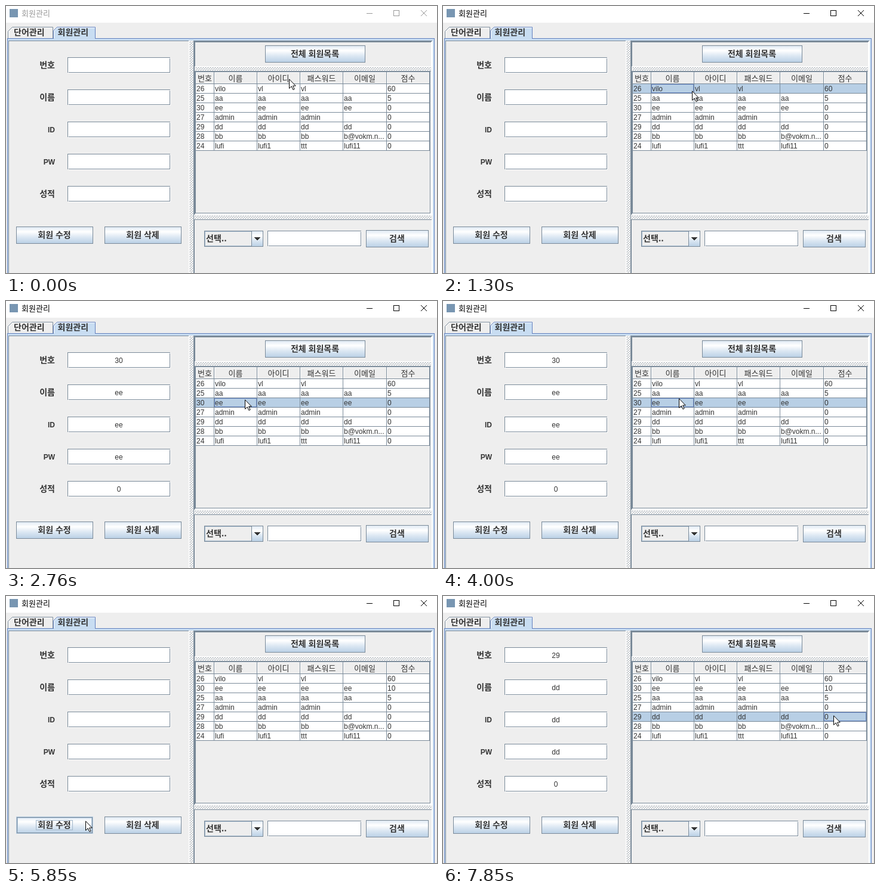
Animation of 722 by 448 pixels, one loop 8 s. Source, as an HTML page:

```html
<!DOCTYPE html>
<html lang="ko">
<head>
<meta charset="utf-8">
<style>
html, body { margin: 0; width: 100%; height: 100%; overflow: hidden; background: #eee; }
svg { display: block; width: 722px; height: 448px; }
rect, .crisp { shape-rendering: crispEdges; }
text { font: 12px "Liberation Sans", "Noto Sans CJK KR", "Noto Sans CJK JP", sans-serif; fill: #333; white-space: pre; }
.ko { font: 13px "Noto Sans CJK KR", "Noto Sans CJK JP", sans-serif; }
.bold { font: bold 14px "Noto Sans CJK KR", "Noto Sans CJK JP", sans-serif; }
.latin { font-weight: bold; }
</style>
</head>
<body>
<svg viewBox="0 0 722 448">
  <defs>
    <linearGradient id="metal" x2="0" y2="1">
      <stop offset="0" stop-color="#dde8f3"/>
      <stop offset=".3" stop-color="#fff"/>
      <stop offset=".6" stop-color="#dde8f3"/>
      <stop offset="1" stop-color="#b8cfe5"/>
    </linearGradient>
    <pattern id="bumps" width="4" height="4" patternUnits="userSpaceOnUse">
      <path class="crisp" fill="#fff" d="M0 0h1v1h-1zM2 2h1v1h-1z"/>
      <path class="crisp" fill="#7a8a99" d="M1 1h1v1h-1zM3 3h1v1h-1z"/>
    </pattern>
  </defs>
  <g id="still"></g>
  <g id="live"></g>
</svg>
<script>
const LOOP = 8000;
const DARK = '#7a8a99', BLUE = '#6382bf', PALE = '#b8cfe5', TAB = '#c8ddf2', GREY = '#eee';

const fill = (x, y, w, h, color) => `<rect x="${x}" y="${y}" width="${w}" height="${h}" fill="${color}"/>`;
const frame = (x, y, w, h, color) =>
  `<rect x="${x + .5}" y="${y + .5}" width="${w - 1}" height="${h - 1}" fill="none" stroke="${color}"/>`;
const text = (x, y, s, cls = '', anchor = 'start', color = '#333') =>
  `<text x="${x}" y="${y}" class="${cls}" text-anchor="${anchor}" style="fill:${color}">${s}</text>`;
const line = (d, color, extra = '') => `<path d="${d}" fill="none" stroke="${color}" ${extra}/>`;

const columns = [318, 349, 421, 493, 565, 638, 710];
const headers = ['번호', '이름', '아이디', '패스워드', '이메일', '점수'];
const labels = ['번호', '이름', 'ID', 'PW', '성적'];
const members = [
  [26, 'vilo', 'vl', 'vl', '', 60],
  [25, 'aa', 'aa', 'aa', 'aa', 5],
  [30, 'ee', 'ee', 'ee', 'ee', 0],
  [27, 'admin', 'admin', 'admin', '', 0],
  [29, 'dd', 'dd', 'dd', 'dd', 0],
  [28, 'bb', 'bb', 'bb', 'b@vokm.n...', 0],
  [24, 'lufi', 'lufi1', 'ttt', 'lufi11', 0]
];
const ranked = members.map(m => m[0] === 30 ? [...m.slice(0, 5), 10] : m);
ranked.splice(1, 2, ranked[2], ranked[1]);

const listButton = { x: 434, y: 66, w: 168, h: 29, label: '전체 회원목록' };
const editButton = { x: 17, y: 370, w: 129, h: 29, label: '회원 수정' };
const deleteButton = { x: 165, y: 370, w: 129, h: 29, label: '회원 삭제' };
const searchButton = { x: 603, y: 376, w: 105, h: 29, label: '검색' };

function button({ x, y, w, h, label }, { hover, pressed, focus } = {}) {
  let s = fill(x, y, w, h, pressed ? PALE : 'url(#metal)');
  if (pressed) {
    s += frame(x, y, w, h, DARK) + fill(x + 1, y + 1, w - 2, 1, DARK) + fill(x + 1, y + 1, 1, h - 2, DARK);
  } else if (hover) {
    s += frame(x, y, w, h, PALE) + frame(x + 1, y + 1, w - 2, h - 2, DARK) + frame(x + 2, y + 2, w - 4, h - 4, PALE);
  } else {
    s += frame(x, y, w, h, DARK);
  }
  const cx = x + w / 2 - .5;
  if (focus) {
    const half = Math.round(label.length * 6.1);
    s += frame(Math.floor(cx) - half, y + 6, half * 2, 17, '#a3b8cc');
  }
  return s + text(cx, y + 19, label, 'bold', 'middle');
}

const inputBox = (x, y, w, h) => fill(x, y, w + 1, h + 1, '#fff') + frame(x, y, w, h, DARK)
  + [[0, h], [1, h - 1], [w, 0], [w - 1, 1]].map(([dx, dy]) => fill(x + dx, y + dy, 1, 1, GREY)).join('');

// sunken pane: shadow on top and left, light on bottom and right
const pane = (x, y, right, bottom) =>
  fill(x, y, right - x, 1, DARK) + fill(x, y, 1, bottom - y, DARK)
  + fill(right, y, 1, bottom - y + 1, '#fff') + fill(x + 1, bottom, right - x, 1, '#fff');

const divider = (x, y, w, h) => `<g transform="translate(${x} ${y})">${fill(0, 0, w, h, 'url(#bumps)')}</g>`;

function drawStill() {
  let s = fill(0, 0, 722, 28, '#fff') + fill(6, 5, 14, 14, '#7896b2');

  // tabs and their content border
  s += fill(2, 54, 716, 394, TAB) + fill(4, 58, 711, 390, GREY);
  s += line('M2.5 448V54.5H717.5V448', BLUE, 'class="crisp"');
  s += line('M4.5 54V43L11 36.5H78', '#fff') + line('M3.5 54V42.5L10.5 35.5H78.5V54', DARK);
  s += `<path d="M79.5 55V41.5L85.5 35.5H149.5V55" fill="${TAB}" stroke="${BLUE}"/>`;
  s += line('M80.5 54V42L86 36.5H149', '#fff') + fill(80, 54, 69, 1, TAB);
  s += text(13, 49, '단어관리', 'bold') + text(86.5, 49, '회원관리', 'bold');

  // nested split panes
  s += pane(4, 58, 306, 448) + divider(307, 59, 7, 389) + pane(314, 58, 714, 448);
  s += pane(315, 59, 713, 350) + divider(316, 351, 397, 7) + pane(315, 358, 713, 448);
  s += pane(316, 60, 712, 101) + divider(317, 102, 395, 7) + pane(316, 109, 712, 349);
  s += frame(317, 110, 394, 238, DARK) + fill(711, 110, 1, 239, '#fff') + fill(317, 348, 395, 1, '#fff');

  // table header
  headers.forEach((name, i) => {
    const x = columns[i], right = columns[i + 1];
    s += fill(x, 111, right - x - 1, 1, '#fff') + fill(x, 111, 1, 19, '#fff');
    s += fill(right - 1, 111, 1, 20, DARK) + text((x + right) / 2 - .5, 126, name, 'ko', 'middle');
  });
  s += fill(318, 130, 392, 1, DARK);

  labels.forEach((name, i) => {
    const y = 86 + 54 * i;
    s += text(82, y + 18, name, i === 2 || i === 3 ? 'latin' : 'bold', 'end') + inputBox(103, y, 172, 26);
  });

  // search bar
  s += button(deleteButton) + button(searchButton) + inputBox(438, 377, 157, 26);
  s += fill(332, 377, 79, 27, GREY) + fill(411, 377, 20, 27, 'url(#metal)');
  s += frame(332, 377, 99, 27, DARK) + frame(333, 378, 79, 25, '#a3b8cc');
  s += fill(411, 378, 1, 25, DARK) + text(335, 395, '선택..', 'bold');
  s += '<path class="crisp" d="M415.5 388H426.5L421 393.5Z" fill="#333"/>';
  return s;
}

// [time, value...]: the latest entry not after t holds
const latest = (list, t) => list.filter(e => e[0] <= t).pop() || [];

const selections = [[1300, 26, 1], [1840, 25, 1], [2300, 30, 1], [5850], [6620, 30, 5], [7770, 29, 5]];
const details = [[1380, 26], [1910, 25], [2370, 30], [5850], [6690, 30], [7850, 29]];
const typedScore = [[0, null], [4770, '1'], [4845, '10']];

// [start, end, steps, points...]: the pointer hops along the points
const moves = [
  [70, 510, 7, [475, 122], [497, 82]],
  [910, 1220, 5, [497, 82], [418, 142]],
  [1380, 1460, 2, [418, 142], [409, 156]],
  [1530, 1690, 3, [409, 156], [407, 161]],
  [1910, 1990, 2, [407, 161], [403, 173]],
  [2690, 3220, 8, [403, 173], [399, 156], [401, 139]],
  [4000, 4450, 7, [401, 139], [396, 163], [330, 232], [255, 300], [190, 341], [172, 320], [205, 316], [251, 315]],
  [4923, 5300, 6, [251, 315], [134, 377]],
  [6540, 6540, 1, [134, 377], [683, 148]],
  [7770, 7770, 1, [683, 148], [655, 200]]
];

function pointerAt(t) {
  const move = latest(moves, t);
  if (!move.length) return moves[0][3];
  const [start, end, steps, ...points] = move;
  const gap = steps > 1 ? (end - start) / (steps - 1) : 1;
  const done = Math.min(steps, Math.floor((t - start + 8) / gap) + 1) / steps;
  const along = done * (points.length - 1);
  const i = Math.min(Math.floor(along + 1e-6), points.length - 2);
  return points[i].map((v, axis) => Math.round(v + (points[i + 1][axis] - v) * (along - i)));
}

const inside = ([px, py], { x, y, w, h }) => px >= x && px < x + w && py >= y && py < y + h;
const between = (t, a, b) => t >= a && t < b;

function drawTable(t) {
  const [, id, col] = latest(selections, t);
  let s = '';
  (t < 5850 ? members : ranked).forEach((row, r) => {
    const y = 131 + 16 * r, chosen = row[0] === id;
    s += fill(318, y, 392, 15, chosen ? PALE : '#fff') + fill(318, y + 15, 392, 1, DARK);
    row.forEach((value, c) => {
      const x = columns[c], next = columns[c + 1];
      s += fill(next - 1, y, 1, 15, DARK) + text(x + 1, y + 12, value);
      if (chosen && c === col && !between(t, 4300, 5850)) s += frame(x, y, next - x - 1, 15, BLUE);
    });
  });
  return s;
}

function drawFields(t) {
  const [, id] = latest(details, t);
  const member = (t < 5850 ? members : ranked).find(m => m[0] === id);
  if (!member) return '';
  const score = t < 5850 && latest(typedScore, t)[1] || member[5];
  const mark = between(t, 4370, 4770) ? fill(185, 308, 7, 14, PALE) : '';
  return mark + [...member.slice(0, 4), score]
    .map((value, i) => text(189, 104 + 54 * i, value, '', 'middle')).join('');
}

function drawPointer([x, y]) {
  const overField = labels.some((_, i) => inside([x, y], { x: 103, y: 86 + 54 * i, w: 172, h: 26 }));
  return `<g transform="translate(${x - 1} ${y})">` + (overField
    ? line('M-3 -7.5H0M1 -7.5H4M.5 -7V8M-3 8.5H0M1 8.5H4', '#000', 'class="crisp"')
    : '<path d="M.5 .8V16.3L4.2 12.8L6.9 18.5L9.2 17.5L6.6 12H11.3Z" fill="#fff" stroke="#000"/>') + '</g>';
}

function drawLive(t) {
  const pointer = pointerAt(t);
  const ink = t < 680 ? '#999' : '#000';
  return text(26, 17, '회원관리', 'ko', 'start', ink)
    + fill(604, 12, 10, 1, ink) + frame(649, 7, 10, 10, ink) + line('M695 7L705 17M705 7L695 17', ink)
    + button(listButton, {
        hover: inside(pointer, listButton),
        pressed: between(t, 680, 830) || between(t, 5690, 5850),
        focus: between(t, 680, 1300)
      })
    + button(editButton, {
        hover: inside(pointer, editButton),
        pressed: between(t, 5460, 5850),
        focus: between(t, 5460, 6620)
      })
    + drawTable(t) + drawFields(t) + drawPointer(pointer);
}

const live = document.getElementById('live');
document.getElementById('still').innerHTML = drawStill();
let shown = '';
const began = performance.now();

function render() {
  const picture = drawLive((performance.now() - began) % LOOP);
  if (picture !== shown) live.innerHTML = shown = picture;
  requestAnimationFrame(render);
}
render();
</script>
</body>
</html>
```
